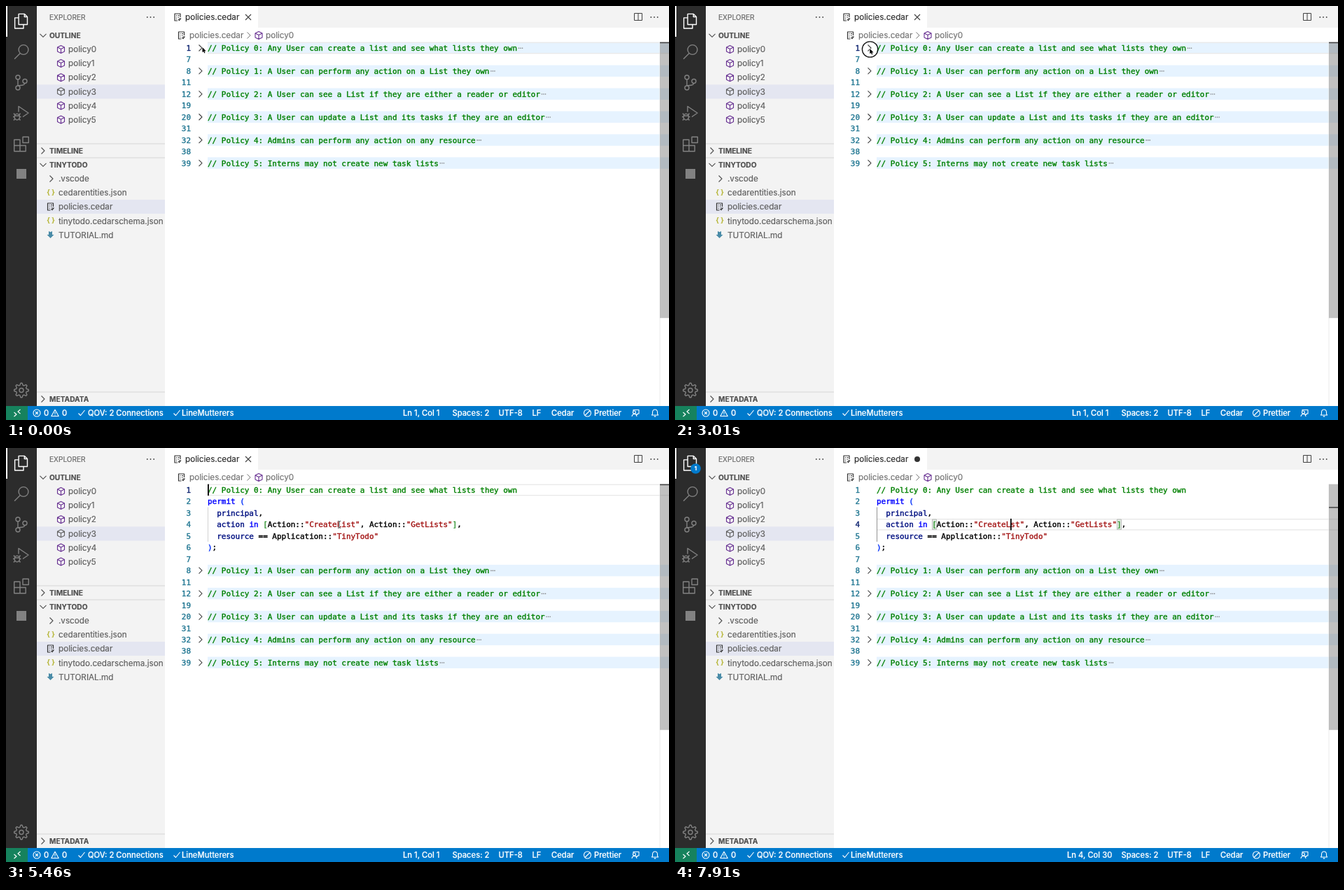
These frames come from a looping animation (947 px wide and 592 px high, 8 s). An HTML page with a canvas:

```html
<!DOCTYPE html>
<html lang="en">
<head>
<meta charset="utf-8">
<title>Policy editor</title>
<style>
html, body { margin: 0; width: 100%; height: 100%; overflow: hidden; background: #fff; }
canvas { display: block; width: 947px; height: 592px; }
</style>
</head>
<body>
<canvas id="stage"></canvas>
<script>
const W = 947, H = 592, LOOP = 8000, STEP = 70;
const UNFOLD = 3080, LEAVE = 4550, CLICK = 5950, MARK = 6230, EDIT = 7840, BADGE = 7910;
const CW = 6.598, LH = 16.46, TOP = 51.7, LEFT = 288;
const UI = 'Inter, "Open Sans", sans-serif';
const MONO = '"DejaVu Sans Mono", "Liberation Mono", monospace';
const GREY = '#616161', DIM = '#828282', PURPLE = '#652d90', BLUE = '#007acc';

const canvas = document.getElementById('stage');
const ctx = canvas.getContext('2d');
const dpr = window.devicePixelRatio || 1;
canvas.width = W * dpr;
canvas.height = H * dpr;

const ICONS = {
  right: 'M-2.5-4.5L2-0L-2.5 4.5',
  down: 'M-4.5-2.2L0 2.3L4.5-2.2',
  cube: 'M0-5.5L5-3V3L0 5.5L-5 3V-3ZM-5-3L0-.5L5-3M0-.5V5.5',
  doc: 'M4 0V-5H-4V5H0M-2-2.5H-1M.5-2.5H2.5M-2 0H-1M.5 0H2M-2 2.5H-1M1 3L2.5 4.7L5 1.5M2 2H4.5',
  files: 'M-3.9-10.3H4.5L8.5-6.3V4.8H-3.9ZM4.3-10.3V-6.2H8.5M-3.9-4.8H-9.4V10.3H3V4.8',
  search: 'M9.9-3a6.9 6.9 0 1 1-13.8 0a6.9 6.9 0 1 1 13.8 0M-1.9 2.2L-9.9 10.3',
  branch: 'M-2-7.5a3 3 0 1 1-6 0a3 3 0 1 1 6 0M-2 7.5a3 3 0 1 1-6 0a3 3 0 1 1 6 0M8-2a3 3 0 1 1-6 0a3 3 0 1 1 6 0M-5-4.5V4.5M5 1Q4 4-1 4L-5 4.5',
  debug: 'M-4-2V-10L10-.5L2 5M-2.5 5a3.7 4.4 0 1 1-7.4 0a3.7 4.4 0 1 1 7.4 0M-10 3.5H-2.5M-10 5H-12M-2.5 5H-.5M-9.5 2L-11 0M-3 2L-1.5 0M-9.5 8L-11 10M-3 8L-1.5 10',
  blocks: 'M-10.3-6.2H-2V10.3H-10.3ZM-10.3 2H6.2V10.3H-2M2-10.3H10.3V-2H2Z',
  cross: 'M-4-4L4 4M4-4L-4 4',
  split: 'M-5.5-5H5.5V5H-5.5ZM0-5V5',
  remote: 'M-4.5-1L-1 2L-4.5 5M4.5-5L1-2L4.5 1',
  error: 'M5 0a5 5 0 1 1-10 0a5 5 0 1 1 10 0M-2-2L2 2M2-2L-2 2',
  warn: 'M0-4.8L5.2 4.5H-5.2ZM0-1.5V1.5M0 2.5V3.5',
  check: 'M-4.5 .5L-1.5 3.5L4.5-4',
  off: 'M5 0a5 5 0 1 1-10 0a5 5 0 1 1 10 0M-3.5 3.5L3.5-3.5',
  feedback: 'M-3-2.5V-4.5H5V1H3.5L2 2.5V1M.5-1a2 2 0 1 1-4 0a2 2 0 1 1 4 0M-5 5Q-4.5 1.5-1.5 1.5T2 5',
  bell: 'M-4.5 3H4.5L3.5 1V-1.5Q3-5 0-5T-3.5-1.5V1ZM-1.2 4.5Q0 5.5 1.2 4.5'
};

const FOLDS = [
  [1, 'Policy 0: Any User can create a list and see what lists they own'],
  [8, 'Policy 1: A User can perform any action on a List they own'],
  [12, 'Policy 2: A User can see a List if they are either a reader or editor'],
  [20, 'Policy 3: A User can update a List and its tasks if they are an editor'],
  [32, 'Policy 4: Admins can perform any action on any resource'],
  [39, 'Policy 5: Interns may not create new task lists']
];
const GAPS = [7, 11, 19, 31, 38];

// time, x, y of the pointer
const POINTER = [
  [0, 280.5, 59], [420, 280, 59.3], [770, 280, 59.5], [840, 279, 60.3],
  [1960, 279, 60.3], [2310, 278.3, 61], [4270, 278.3, 61],
  [5250, 476, 109.5], [5460, 476, 109.5], [5880, 479, 110]
];

function rect(x, y, w, h, color) {
  ctx.fillStyle = color;
  ctx.fillRect(x, y, w, h);
}

function frame(x, y, w, h, color) {
  ctx.strokeStyle = color;
  ctx.lineWidth = 1;
  ctx.strokeRect(x, y, w, h);
}

function disc(x, y, r, color) {
  ctx.fillStyle = color;
  ctx.beginPath();
  ctx.arc(x, y, r, 0, Math.PI * 2);
  ctx.fill();
}

// A hairline outline gives the letters the weight of smoothed screen type.
function text(s, x, y, size = 11.7, color = GREY, weight = 400, font = UI) {
  const base = y + size * 0.364;
  ctx.font = `${weight} ${size}px ${font}`;
  ctx.fillStyle = ctx.strokeStyle = color;
  ctx.lineWidth = font === MONO ? 0.4 : 0.2;
  ctx.lineJoin = 'round';
  ctx.fillText(s, x, base);
  ctx.strokeText(s, x, base);
}

function icon(name, x, y, color = '#424242', width = 1) {
  ctx.save();
  ctx.translate(x, y);
  ctx.strokeStyle = color;
  ctx.lineWidth = width;
  ctx.stroke(new Path2D(ICONS[name]));
  ctx.restore();
}

function dots(x, y, gap, r, color) {
  for (const i of [-1, 0, 1]) disc(x + i * gap, y, r, color);
}

function gear(x, y) {
  ctx.strokeStyle = DIM;
  ctx.lineWidth = 1.4;
  ctx.beginPath();
  for (let i = 0; i < 32; i++) {
    const a = (i - 0.5) / 32 * Math.PI * 2;
    const r = i % 4 < 2 ? 10.3 : 7.5;
    ctx.lineTo(x + r * Math.cos(a), y + r * Math.sin(a));
  }
  ctx.closePath();
  ctx.moveTo(x + 3, y);
  ctx.arc(x, y, 3, 0, Math.PI * 2);
  ctx.stroke();
}

function activityBar(t) {
  rect(0, 0, 44, 572, '#2c2c2c');
  rect(0, 0, 2, 44, '#fff');
  icon('files', 22, 21.7, '#fff', 1.4);
  ['search', 'branch', 'debug', 'blocks'].forEach((n, i) => icon(n, 22, 65.5 + 44 * i, DIM, 1.4));
  rect(15, 233, 14, 14, DIM);
  gear(22, 549.5);
  if (t >= BADGE) {
    disc(29.5, 29.5, 7.3, BLUE);
    text('1', 27.7, 29.5, 8.2, '#fff', 700);
  }
}

function section(label, y, open, line) {
  if (line) rect(44, y - 10.5, 183, 1, '#d6d6d6');
  icon(open ? 'down' : 'right', 53, y, '#505050', 1.1);
  text(label, 62, y, 10.2, '#505050', 700);
}

function sidebar() {
  rect(44, 0, 183, 572, '#f3f3f3');
  text('EXPLORER', 62, 16, 10.1, '#6a6a6a');
  dots(206.5, 16, 4.7, 0.9, '#424242');

  section('OUTLINE', 42, true);
  rect(44, 112.4, 183, 20.1, '#e4e6f1');
  for (let i = 0; i < 6; i++) {
    const y = 62 + i * 20.1;
    icon('cube', 78.5, y, i === 3 ? GREY : PURPLE, 1.1);
    text('policy' + i, 89, y);
  }

  section('TIMELINE', 207, false, true);
  section('TINYTODO', 227, true, true);
  rect(44, 277, 183, 20, '#e4e6f1');
  icon('right', 65, 247, '#505050', 1.1);
  icon('doc', 63.5, 287, '#333', 1.2);
  ['.vscode', 'cedarentities.json', 'policies.cedar', 'tinytodo.cedarschema.json', 'TUTORIAL.md']
    .forEach((name, i) => text(name, 75, 247 + 20.1 * i));
  for (const y of [267, 307]) text('{ }', 58.3, y - 0.5, 10, '#b7b73b', 600);
  ctx.fillStyle = '#498ba7';
  ctx.fill(new Path2D('M61 322l2.5 1.3l2.5-1.3v5h2.5l-5 5l-5-5h2.5Z'));

  section('METADATA', 562, false, true);
}

function header(t) {
  rect(227, 0, 720, 31, '#f3f3f3');
  rect(227, 0, 133, 31, '#fff');
  icon('doc', 245, 16, '#333', 1.2);
  text('policies.cedar', 256, 16, 11.7, '#333');
  if (t >= EDIT) disc(346, 16, 4, '#333');
  else icon('cross', 346, 16, '#424242', 1.1);
  icon('split', 903, 15.5);
  dots(926, 16, 4.7, 0.9, '#424242');

  icon('doc', 250.5, 42, '#333', 1.2);
  text('policies.cedar', 262, 42, 11.7, '#767676');
  icon('right', 347, 42, '#767676');
  icon('cube', 361, 42, PURPLE, 1.1);
  text('policy0', 371, 42, 11.7, '#767676');
}

function statusBar(t) {
  rect(0, 572, W, 20, BLUE);
  rect(0, 572, 31, 20, '#16825d');
  const label = (s, x) => text(s, x, 582, 11.2, '#fff', 500);
  const mark = (n, x) => icon(n, x, 582, '#fff', 1.1);
  mark('remote', 16);
  mark('error', 44);
  label('0', 54);
  mark('warn', 70);
  label('0', 80);
  mark('check', 108);
  label('QOV: 2 Connections', 117);
  mark('check', 244);
  label('LineMutterers', 251);
  if (t >= CLICK) label('Ln 4, Col 30', 560);
  else label('Ln 1, Col 1', 567);
  label('Spaces: 2', 637.5);
  label('UTF-8', 703.5);
  label('LF', 751.5);
  label('Cedar', 779);
  mark('off', 830.5);
  label('Prettier', 840);
  mark('feedback', 899);
  mark('bell', 927);
}

const rowTop = i => TOP + i * LH;
const rowMid = i => rowTop(i) + 8.3;
const colX = c => LEFT + c * CW;

function lineNumber(n, row, active) {
  ctx.textAlign = 'right';
  text(n, 264, rowMid(row), 10.96, active ? '#0b216f' : '#237893', 400, MONO);
  ctx.textAlign = 'left';
}

function tokenColor(s) {
  if (s[0] === '"') return '#a31515';
  if (/^(permit|in)$/.test(s)) return '#0000ff';
  if (/^(principal|action|resource)$/.test(s)) return '#001080';
  if (/[()]/.test(s)) return '#0431fa';
  if (/[[\]]/.test(s)) return '#319331';
  return '#000';
}

function codeLine(s, row) {
  const comment = s.startsWith('//');
  const parts = s.matchAll(comment ? /\S+/g : /"[^"]*"|\w+|\S/g);
  for (const p of parts) {
    text(p[0], colX(p.index), rowMid(row), 10.96, comment ? '#008000' : tokenColor(p[0]), 400, MONO);
  }
}

function foldLine([n, title], row, folded, active) {
  const s = '// ' + title;
  lineNumber(n, row, active);
  codeLine(s, row);
  if (!folded) return;
  icon('right', 278, rowMid(row), '#424242', 1.1);
  dots(colX(s.length) + 5, rowMid(row) + 0.2, 2.5, 0.8, '#777');
}

function currentLine(row) {
  rect(LEFT, rowTop(row), W - LEFT, 1.4, '#e9e9e9');
  rect(LEFT, rowTop(row + 1) - 1.2, W - LEFT, 1.4, '#e9e9e9');
}

function caretOn(t) {
  if (t >= EDIT) return true;
  const k = Math.floor((t - (t < CLICK ? 30 : CLICK)) / 525);
  return k >= 0 && k % 2 === 0;
}

function editor(t) {
  rect(227, 31, 720, 541, '#fff');
  const open = t >= UNFOLD, clicked = t >= CLICK, edited = t >= EDIT;
  const marked = t >= MARK && !edited;
  const foldRow = i => i * 2 + (open && i ? 5 : 0);

  FOLDS.forEach((f, i) => {
    if (i || !open) rect(LEFT, rowTop(foldRow(i)), W - LEFT, LH, '#e6f3ff');
  });
  currentLine(clicked ? 3 : 0);

  if (clicked) {
    if (marked) rect(colX(22), rowTop(3), 10 * CW, LH, '#d5d5d5');
    for (const c of [12, edited ? 52 : 53]) {
      rect(colX(c), rowTop(3) + 0.5, CW, LH - 1, '#e5efe5');
      frame(colX(c) + 0.3, rowTop(3) + 1, CW - 0.6, LH - 2, '#b9b9b9');
    }
  }

  FOLDS.forEach((f, i) => foldLine(f, foldRow(i), i > 0 || !open, i === 0 && !clicked));
  GAPS.forEach((n, i) => lineNumber(n, foldRow(i + 1) - 1, false));

  if (open) {
    rect(LEFT, rowTop(2), 1, 3 * LH, clicked ? '#939393' : '#d3d3d3');
    const word = edited ? 'CreateLst' : 'CreateList';
    [
      'permit (',
      '  principal,',
      `  action in [Action::"${word}", Action::"GetLists"],`,
      '  resource == Application::"TinyTodo"',
      ');'
    ].forEach((s, i) => {
      lineNumber(i + 2, i + 1, clicked && i === 2);
      codeLine(s, i + 1);
    });
    ctx.globalAlpha = Math.max(0, Math.min(1, 1 - (t - LEAVE) / 490));
    for (const row of [0, 1]) icon('down', 278, rowMid(row), '#424242', 1.1);
    ctx.globalAlpha = 1;
  }

  if (caretOn(t)) rect(clicked ? colX(29) - 0.4 : LEFT, rowTop(clicked ? 3 : 0), 1.8, LH, '#000');
  scrollbar(open, clicked, marked);
}

function scrollbar(open, clicked, marked) {
  rect(933.5, TOP, 1, 520, '#ececec');
  if (marked) for (const y of [86, 219.5]) rect(938, y, 5, 10.5, '#a0a0a0');
  rect(934, TOP, 13, open ? 351.5 : 394.5, 'rgba(100,100,100,0.4)');
  rect(934, clicked ? 84.3 : TOP, 13, 1.5, '#424242');
}

function pointerAt(t) {
  const i = POINTER.findIndex(p => p[0] > t);
  if (i < 0) return POINTER[POINTER.length - 1].slice(1);
  const [t0, x0, y0] = POINTER[i - 1], [t1, x1, y1] = POINTER[i];
  const u = (t - t0) / (t1 - t0), e = u * u * (3 - 2 * u);
  return [x0 + (x1 - x0) * e, y0 + (y1 - y0) * e];
}

function pointer(t) {
  if (t >= EDIT) return;
  const [x, y] = pointerAt(t);
  ctx.save();
  ctx.translate(x, y);
  ctx.lineJoin = 'round';
  if (x < 290) {
    const arrow = new Path2D('M0 0V7.3L1.7 5.9L2.8 8.5L4 8L2.9 5.5H5.2Z');
    ctx.strokeStyle = '#fff';
    ctx.lineWidth = 1.2;
    ctx.stroke(arrow);
    ctx.fillStyle = '#000';
    ctx.fill(arrow);
  } else {
    const beam = new Path2D('M-2-5Q0-5 0-3.8Q0-5 2-5M0-4V4M-2 5Q0 5 0 3.8Q0 5 2 5');
    for (const [color, width] of [['#fff', 2], ['#222', 0.9]]) {
      ctx.strokeStyle = color;
      ctx.lineWidth = width;
      ctx.stroke(beam);
    }
  }
  ctx.restore();

  const pressed = [UNFOLD - 140, CLICK].some(s => t >= s && t < s + 140);
  if (pressed) {
    ctx.strokeStyle = '#111';
    ctx.lineWidth = 1.3;
    ctx.beginPath();
    ctx.arc(x + 0.3, y + (x < 290 ? 1 : 0), 11.2, 0, Math.PI * 2);
    ctx.stroke();
  }
}

function draw(now) {
  const t = Math.min(Math.floor((now % LOOP) / STEP) * STEP, BADGE);
  ctx.setTransform(dpr, 0, 0, dpr, 0, 0);
  editor(t);
  header(t);
  sidebar();
  activityBar(t);
  statusBar(t);
  pointer(t);
}

const start = performance.now();
function loop() {
  draw(performance.now() - start);
  requestAnimationFrame(loop);
}
loop();
</script>
</body>
</html>
```
